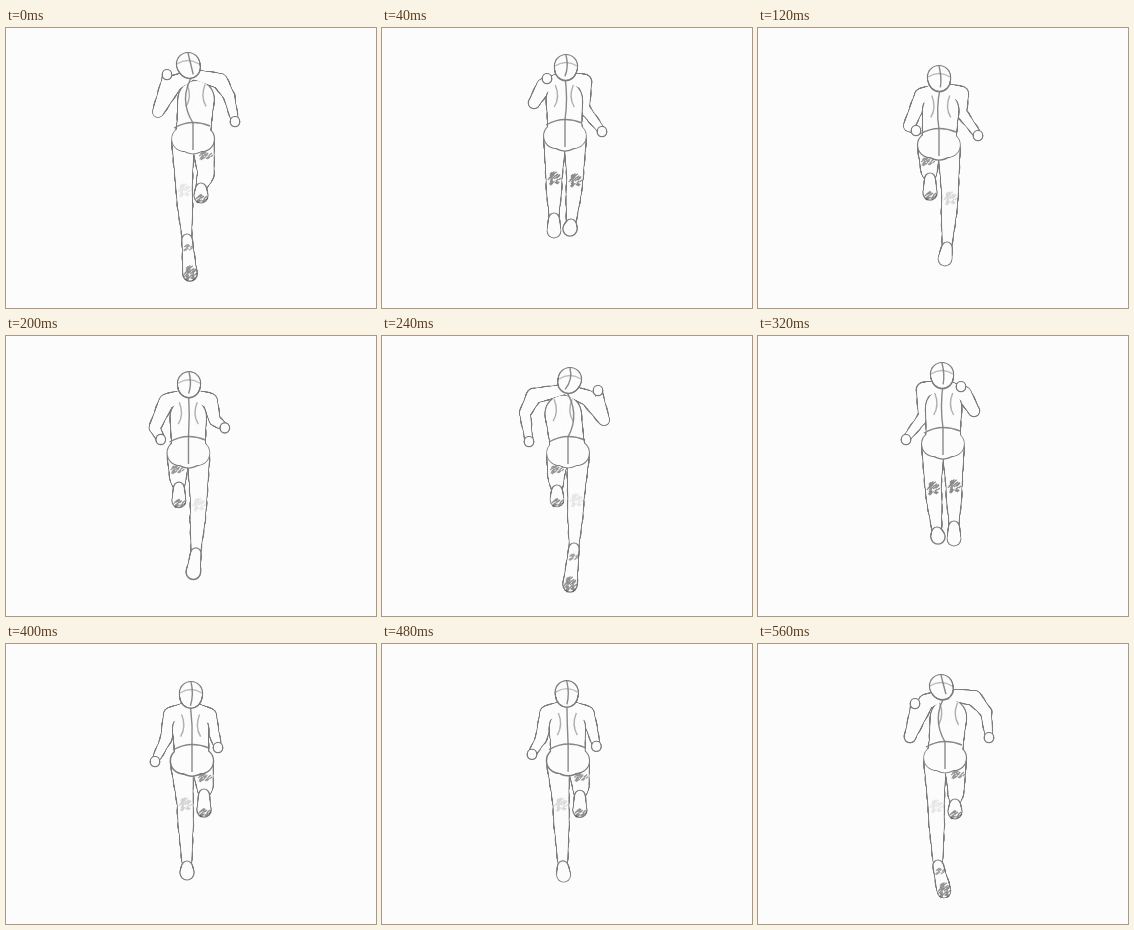
Animation of 370x280 px, one loop 600 ms. Source, as an HTML page with a canvas:

```html
<!DOCTYPE html>
<html lang="en">
<head>
<meta charset="utf-8">
<title>Runner from behind</title>
<style>
html, body { margin: 0; width: 100%; height: 100%; overflow: hidden; background: #fcfcfc; }
canvas { display: block; filter: blur(.35px); }
</style>
</head>
<body>
<canvas id="stage" width="370" height="280"></canvas>
<script>
const ctx = document.getElementById('stage').getContext('2d');
const LOOP = 600, STEP = 40, AXIS = 184;
const PAPER = '#fcfcfc', PENCIL = '#7c7c7c';

// Joints of the key poses. Arms: shoulder, elbow, hand. Legs: knee, ankle, toe. L and R as seen.
const toeOff = {
  head: [[182, 37]], hip: [[187, 109]],
  armL: [[169, 55], [152, 84], [161, 46]], armR: [[214, 53], [223, 68], [229, 93]],
  legL: [[178, 160], [181, 211], [184, 246]], legR: [[200, 146], [195, 160], [195, 168]]
};
const standRight = {
  head: [[181, 50]], hip: [[181, 115]],
  armL: [[164, 68], [151, 98], [158, 102]], armR: [[203, 66], [203, 84], [220, 107]],
  legL: [[171, 142], [172, 150], [172, 165]], legR: [[192, 168], [189, 219], [187, 231]]
};
const pushRight = {
  head: [[188, 44]], hip: [[186, 115]],
  armL: [[152, 60], [143, 77], [147, 105]], armR: [[206, 62], [222, 84], [216, 54]],
  legL: [[174, 140], [175, 154], [175, 164]], legR: [[194, 162], [192, 212], [188, 249]]
};
const flight = {
  head: [[184, 39]], hip: [[185, 106]],
  armL: [[166, 54], [166, 80], [148, 103]], armR: [[206, 58], [216, 75], [203, 50]],
  legL: [[175, 150], [179, 196], [180, 201]], legR: [[196, 148], [196, 190], [196, 203]]
};
const standLeft = {
  head: [[185, 50]], hip: [[186, 115]],
  armL: [[165, 71], [160, 95], [149, 117]], armR: [[203, 72], [207, 86], [212, 103]],
  legL: [[179, 158], [181, 222], [181, 229]], legR: [[199, 142], [198, 150], [198, 166]]
};
const reachLeft = {
  head: [[183, 43]], hip: [[187, 112]],
  armL: [[168, 58], [152, 93], [157, 59]], armR: [[216, 54], [228, 68], [231, 93]],
  legL: [[178, 160], [180, 221], [186, 247]], legR: [[198, 145], [197, 160], [197, 168]]
};

const mirror = pose => Object.fromEntries(Object.entries(pose).map(([name, joints]) => [
  name.replace(/[LR]$/, side => side === 'L' ? 'R' : 'L'),
  joints.map(([x, y]) => [2 * AXIS - x, y])
]));

// Time, pose and the easing power used on the way to the next pose.
const keys = [
  [0, toeOff, 1], [40, mirror(flight), 1], [120, standRight, 3], [240, pushRight, 1],
  [320, flight, 1], [400, standLeft, 3], [560, reachLeft, 1], [LOOP, toeOff, 1]
];

const mix = (a, b, f) => a.map((v, i) => v + (b[i] - v) * f);
const shift = ([x, y], dx, dy) => [x + dx, y + dy];

function poseAt(t) {
  const next = keys.findIndex(([time]) => time > t);
  const [t0, a, power] = keys[next - 1], [t1, b] = keys[next];
  const f = ((t - t0) / (t1 - t0)) ** power;
  const pose = {};
  for (const name in a) pose[name] = a[name].map((joint, i) => mix(joint, b[name][i], f));
  return pose;
}

// A chain of [x, y, radius] nodes becomes a row of overlapping discs.
function discs(nodes) {
  const row = [];
  for (let i = 1; i < nodes.length; i++) {
    const a = nodes[i - 1], b = nodes[i];
    const n = Math.ceil(Math.hypot(b[0] - a[0], b[1] - a[1])) + 1;
    for (let k = 0; k <= n; k++) row.push(mix(a, b, k / n));
  }
  return row;
}

function fillDiscs(row, color, grow) {
  ctx.fillStyle = color;
  row.forEach(([x, y, r], i) => {
    ctx.beginPath();
    ctx.arc(x, y, r + grow(i), 0, 2 * Math.PI);
    ctx.fill();
  });
}

// Outline of the union: wider discs in pencil, then the same discs in paper.
function flesh(...chains) {
  const row = chains.flatMap(discs);
  fillDiscs(row, PENCIL, i => .6 + .35 * Math.sin(i * .4));
  fillDiscs(row, PAPER, () => -.6);
}

function line(from, bend, to, alpha = .9) {
  ctx.globalAlpha = alpha;
  ctx.strokeStyle = PENCIL;
  ctx.lineWidth = 1.4;
  ctx.beginPath();
  ctx.moveTo(...from);
  ctx.quadraticCurveTo(...bend, ...to);
  ctx.stroke();
  ctx.globalAlpha = 1;
}

// Pencil hatching in an ellipse, from a fixed random seed.
function hatch([x, y], rx, ry, alpha) {
  let seed = 7;
  const random = () => (seed = seed * 16807 % 2147483647) / 2147483647;
  ctx.strokeStyle = `rgba(70,70,70,${alpha})`;
  ctx.lineWidth = 1.2;
  ctx.beginPath();
  for (let i = 0; i < rx * ry; i++) {
    const angle = random() * 2 * Math.PI, reach = Math.sqrt(random());
    const px = x + rx * reach * Math.cos(angle), py = y + ry * reach * Math.sin(angle);
    ctx.moveTo(px - 1.2, py + 1);
    ctx.lineTo(px + 1.2, py - 1);
  }
  ctx.stroke();
}

function drawLeg(hip, side, [knee, ankle, toe], kneeShade) {
  const thigh = shift(hip, side * 10, 6);
  const lifted = ankle[1] - knee[1] < 25;
  flesh([[...thigh, 11], [...knee, 8], [...mix(knee, ankle, .35), 7.5], [...ankle, 4.5]]);
  flesh([[...ankle, 5], [...toe, 7]]);
  if (lifted) {
    hatch(shift(hip, side * 12, 19), 7, 4, .55);
    hatch(shift(toe, 0, 3), 6, 4, .6);
  } else {
    hatch(shift(knee, 0, 3), 6, 7, kneeShade);
  }
  if (toe[1] - ankle[1] > 20) {
    hatch(mix(ankle, toe, .25), 5, 3, .5);
    hatch(toe, 6, 8, .6);
  }
}

function draw(t) {
  const { head: [head], hip: [hip], armL, armR, legL, legR } = poseAt(t);
  const shoulders = mix(armL[0], armR[0], .5);
  const neck = mix(head, shoulders, .55), chest = mix(shoulders, hip, .3);
  const arms = [armL, armR];

  ctx.fillStyle = PAPER;
  ctx.fillRect(0, 0, 370, 280);

  for (const [shoulder, elbow, hand] of arms) {
    flesh([[...neck, 5], [...shoulder, 7.5], [...elbow, 5.5], [...hand, 3.5]]);
  }

  // The knees are darkest while both feet are off the ground.
  const height = 236 - Math.max(legL[2][1], legR[2][1]);
  const kneeShade = .12 + .5 * Math.min(1, Math.max(0, height / 33));
  const legs = [[-1, legL], [1, legR]].sort((a, b) => b[1][1][1] - a[1][1][1]);
  for (const [side, leg] of legs) drawLeg(hip, side, leg, kneeShade);

  flesh(
    [[...chest, 18], [...mix(chest, hip, .55), 17], [...hip, 17]],
    [[...shift(hip, -9, 2), 12.5], [...shift(hip, 9, 2), 12.5]]
  );
  for (const [shoulder, , hand] of arms) {
    fillDiscs(discs([[...neck, 5], [...shoulder, 7.5]]), PAPER, () => -.6);
    flesh([[...hand, 4.5], [...shift(hand, 0, 1), 4.5]]);
  }

  const waist = shift(hip, 0, -14), sway = 1.6 * (head[0] - shoulders[0]);
  line(neck, shift(mix(neck, waist, .5), sway, 0), waist);
  line(waist, hip, shift(hip, 0, 13));
  line(shift(hip, -19, -9), shift(hip, -2, -19), shift(hip, 17, -11));
  for (const side of [-1, 1]) {
    const blade = shift(chest, side * 9, 0);
    line(shift(blade, 0, -14), shift(blade, -side * 5, -2), shift(blade, side, 8), .6);
  }

  flesh([[...shift(head, 0, -1), 11.5], [...mix(head, neck, .3), 10.5]]);
  line(shift(head, 0, -12), shift(head, 3, 0), neck);
  line(shift(head, -11, -1), shift(head, 0, -8), shift(head, 11, -1), .5);
}

const start = performance.now();
function tick() {
  const t = (performance.now() - start) % LOOP;
  draw(Math.floor(t / STEP) * STEP);
  requestAnimationFrame(tick);
}
tick();
</script>
</body>
</html>
```
